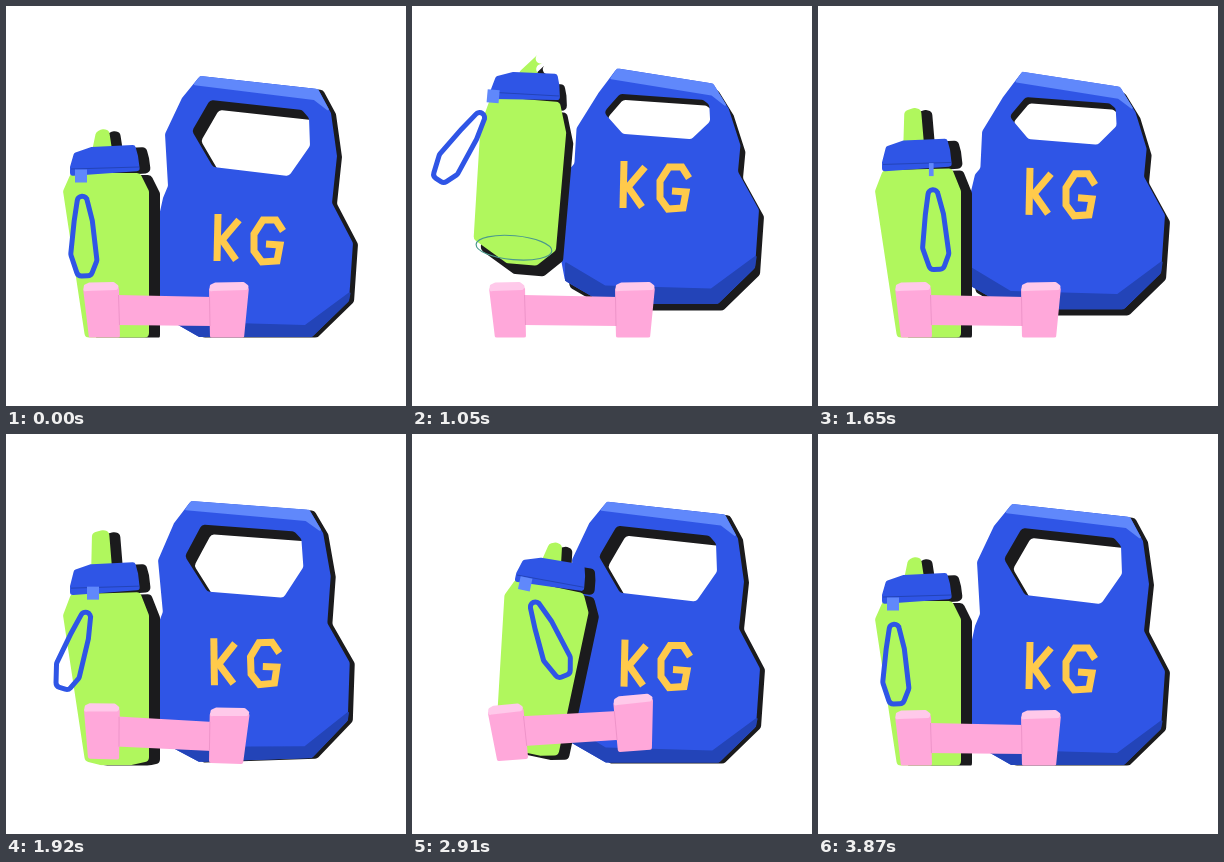
An HTML page with a canvas that plays this animation: 400 by 400 pixels, repeating every 3.9 s.

```html
<!DOCTYPE html>
<html lang="en">
<head>
<meta charset="utf-8">
<title>Gym kit</title>
<style>
html, body { margin: 0; width: 100%; height: 100%; overflow: hidden; background: #fff; }
canvas { display: block; width: 400px; height: 400px; }
</style>
</head>
<body>
<canvas id="stage" width="400" height="400"></canvas>
<script>
const ctx = document.getElementById('stage').getContext('2d');
const LOOP = 3900, STEP = 30, GROUND = 331.5;
const BLUE = '#2f55e6', LIGHT = '#6088fb', DARK = '#2344b8', BLACK = '#1b1b1d',
  GREEN = '#b0f75d', PINK = '#ffa8da', PALE = '#ffc9ea', ROSE = '#ee94c9', GOLD = '#ffca4b';

const mix = (a, b, k) => a + (b - a) * k;
const radians = degrees => degrees * Math.PI / 180;

// Eased value at time t from [time, value] keys.
function track(t, ...keys) {
  const next = keys.findIndex(([time]) => t <= time);
  if (next < 1) return keys.at(next)[1];
  const [[t0, a], [t1, b]] = [keys[next - 1], keys[next]];
  const k = (t - t0) / (t1 - t0);
  return mix(a, b, k * k * (3 - 2 * k));
}

// Ballistic height between take-off and landing.
function hop(t, start, end, height) {
  const k = (2 * t - start - end) / (end - start);
  return Math.max(0, height * (1 - k * k));
}
const jointHop = (t, height) => hop(t, 1890, 2980, height);

// Closed outline with softened corners.
function trace(pts, dx = 0, dy = 0, radius = 5) {
  const at = i => pts[(i + pts.length) % pts.length];
  const [ax, ay] = at(-1), [bx, by] = at(0);
  ctx.moveTo((ax + bx) / 2 + dx, (ay + by) / 2 + dy);
  pts.forEach(([x, y], i) => {
    const [nx, ny] = at(i + 1);
    ctx.arcTo(x + dx, y + dy, (x + nx) / 2 + dx, (y + ny) / 2 + dy, radius);
  });
  ctx.closePath();
}
function fill(color, pts, dx, dy, radius) {
  ctx.beginPath();
  trace(pts, dx, dy, radius);
  ctx.fillStyle = color;
  ctx.fill();
}
function line(color, width, pts) {
  ctx.beginPath();
  pts.forEach(([x, y]) => ctx.lineTo(x, y));
  ctx.strokeStyle = color;
  ctx.lineWidth = width;
  ctx.stroke();
}
function pose(px, py, dx, dy, degrees, draw) {
  ctx.save();
  ctx.translate(px + dx, py + dy);
  ctx.rotate(radians(degrees));
  ctx.translate(-px, -py);
  draw();
  ctx.restore();
}

const shell = [[194,70], [312,83], [325,107], [331,150], [326,197], [347,237], [343,295], [306,331],
  [193,331], [153,308], [143,255], [157,192], [162,180], [159,128], [176,92]];
const grip = [[204,94], [296,104], [303,112], [304,140], [283,170], [207,161], [186,125]];
const rimEdge = [[308,94], [187,79]];
const baseEdge = [[153,292], [193,316], [299,319], [345,285]];

// Leaning back shortens everything above the neck of the kettlebell.
function foreshorten([x, y], tip) {
  const f = Math.max(0, (200 - y) / 130);
  return [mix(x, 247, .25 * f * f * tip), y + tip * f * (95 - 64 * f)];
}

function drawLetters() {
  ctx.lineJoin = 'miter';
  line(GOLD, 7, [[212,208], [211,255]]);
  line(GOLD, 7, [[233,214], [216,234], [230,254]]);
  line(GOLD, 7, [[277,225], [270,214], [257,214], [248,228], [248,245], [256,256], [271,255], [274,239], [260,238]]);
}

function drawKettle(t) {
  const tip = track(t, [775, 0], [1150, 1], [1550, 1], [1865, 0]);
  const turn = track(t, [1800, 0], [1920, -2], [2400, -4], [2750, 2], [2910, 0], [3150, 1], [3400, 0]);
  const dx = track(t, [1800, 0], [1920, -4.5], [2400, -10], [2750, 6], [2910, 1], [3150, 4], [3400, 0]);
  const dy = track(t, [1830, 0], [1920, -4], [2200, 0])
    - hop(t, 775, 1865, 44) - jointHop(t, 10) - hop(t, 2980, 3390, 5);
  const outline = shell.map(p => foreshorten(p, tip));
  const rim = [...outline.slice(0, 3), ...rimEdge.map(p => foreshorten(p, tip))];
  const hole = grip.map(([x, y]) => [mix(x, 245, .12 * tip), mix(y, 161, .49 * tip)]);
  const base = baseEdge.map(([x, y]) => [x, y - 4 * tip]);

  pose(250, 200, dx, dy, turn, () => {
    ctx.beginPath();
    trace(outline, 5, mix(1, 8, tip));
    trace(hole, mix(9, 2, tip), mix(10, 5, tip));
    ctx.fillStyle = BLACK;
    ctx.fill('evenodd');
    ctx.beginPath();
    trace(outline);
    trace(hole);
    ctx.fillStyle = BLUE;
    ctx.fill('evenodd');
    fill(LIGHT, rim, 0, 0, 1);
    fill(DARK, [...outline.slice(6, 10), ...base], 0, 0, 1);
    ctx.translate(0, -24 * tip);
    drawLetters();
  });
}

// Teardrop loop hanging from the origin.
function drawStrap(color, angle, cast = 0) {
  const length = 100, half = 13;
  ctx.save();
  ctx.translate(cast, cast);
  ctx.rotate(radians(-angle));
  ctx.beginPath();
  trace([[0, 0], [-half * .65, length * .45], [-half, length * .78], [-half * .5, length],
    [half * .5, length], [half, length * .85], [half * .75, length * .45]]);
  ctx.strokeStyle = color;
  ctx.lineWidth = 5;
  ctx.stroke();
  ctx.restore();
}

function drawBottle(t) {
  const under = track(t, [450, 0], [720, 1], [1050, 1], [1320, 0]);
  const slump = track(t, [450, 0], [720, 1], [1320, 1], [1550, 0]);
  const pop = track(t, [450, 0], [720, -.8], [1050, -.8], [1320, .8], [1920, 1], [2250, 0]);
  const sway = track(t, [1950, 0], [2400, -8], [2910, 12], [3000, 12], [3400, 7], [3700, 0]);
  const slide = track(t, [1950, 0], [2400, -2], [2910, 21], [3000, 21], [3400, 12], [3700, 0]);
  const squash = track(t, [180, 1], [320, .93], [450, 1], [1347, 1], [1430, .95], [1570, 1]);
  const tagX = track(t, [450, 75], [720, 62], [1000, 62], [1300, 130], [1450, 130], [1920, 87], [2350, 75]);
  const strapAngle = track(t, [400, 2], [690, -42], [1000, -42], [1260, 48], [1380, 48], [1700, 0],
    [1920, -18], [2350, -23], [2900, 23], [3390, 10], [3720, 2]);
  const turn = sway + 5 * under;
  const dy = track(t, [2400, 0], [2910, -8], [3000, -8], [3700, 0]) - hop(t, 451, 1347, 87) - jointHop(t, 36);

  const lift = Math.max(0, pop), neck = 167 + 3 * slump, shoulder = 185 + 15 * slump;
  const body = [[65, neck - 3 * lift], [57, shoulder], [mix(79, 60, under), mix(331, 314, under)], [95, 335],
    [125, 335], [143, mix(331, 318, under)], [143, shoulder], [134, neck - 5 * lift]];
  const capTop = 140 + 3 * slump - 7 * lift, capBase = neck + 3 - 5 * lift;
  const cap = [[64, capBase], [64, capBase - 9], [68, capTop + 7], [85, capTop + 1],
    [129, capTop - 1], [132, capTop + 10], [134, capBase - 5]];
  const tip = 124 - 23 * pop;
  const spout = [[85, 150], [mix(90, 86, lift), tip + 2], [96, tip - 1], [103, tip], [107, 150]];

  pose(100, 250, slide + 7 * under, dy, turn, () => {
    ctx.transform(1, 0, 0, squash, 0, 331 * (1 - squash));
    for (const part of [spout, body, cap]) fill(BLACK, part, mix(11, 8, under), mix(2, 10, under));
    fill(GREEN, spout);
    fill(GREEN, body);
    ctx.globalAlpha = Math.max(0, 2 * under - 1);
    ctx.beginPath();
    ctx.ellipse(101, 319, 38, 12, 0, 0, 2 * Math.PI);
    ctx.strokeStyle = '#4c9a8c';
    ctx.lineWidth = 1.2;
    ctx.stroke();
    ctx.globalAlpha = 1;
    fill(BLUE, cap, 0, 0, 3);
    line(DARK, 1, [[65, capBase - 7], [133, capBase - 9]]);

    ctx.translate(tagX, 170 - 7 * lift);
    ctx.rotate(radians(-turn));
    const cast = 24 * Math.max(0, Math.sin(radians(strapAngle)) - .5);
    if (cast) drawStrap(BLACK, strapAngle, cast);
    drawStrap(BLUE, strapAngle);
    ctx.rotate(radians(turn));
    // The tag narrows as the bottle spins it towards the side.
    const tagWidth = 12 * Math.min(1, (130 - tagX) / 43);
    ctx.fillStyle = LIGHT;
    ctx.fillRect(-tagWidth / 2, -6.5, tagWidth, 13);
  });
}

function drawWeight(x, width, footLeft, footRight) {
  const right = x + width;
  fill(PINK, [[x, 282], [right, 281], [footRight, 332], [footLeft, 332]], 0, 0, 2);
  fill(PALE, [[x, 286], [x + 1, 279], [x + 6, 276.5], [right - 5, 276], [right, 280], [right - 2, 284], [x + 4, 285]], 0, 0, 2);
}

function drawDumbbell(t) {
  const turn = track(t, [1840, 0], [1920, 2], [2400, 6], [2910, -4.3], [3080, 0]);
  pose(160, 304, 0, -jointHop(t, 44), turn, () => {
    fill(PINK, [[110, 289], [208, 291], [208, 320], [110, 319]], 0, 0, 1);
    drawWeight(77, 36, 83, 114);
    drawWeight(203, 40, 204, 238);
    line(ROSE, 1, [[112.5, 289], [113.5, 319]]);
    line(ROSE, 1, [[203.5, 291], [204, 320]]);
  });
}

function frame() {
  const t = Math.floor(performance.now() % LOOP / STEP) * STEP;
  ctx.fillStyle = '#fff';
  ctx.fillRect(0, 0, 400, 400);
  ctx.save();
  ctx.beginPath();
  ctx.rect(0, 0, 400, GROUND);
  ctx.clip();
  drawKettle(t);
  drawBottle(t);
  drawDumbbell(t);
  ctx.restore();
  requestAnimationFrame(frame);
}
frame();
</script>
</body>
</html>
```
